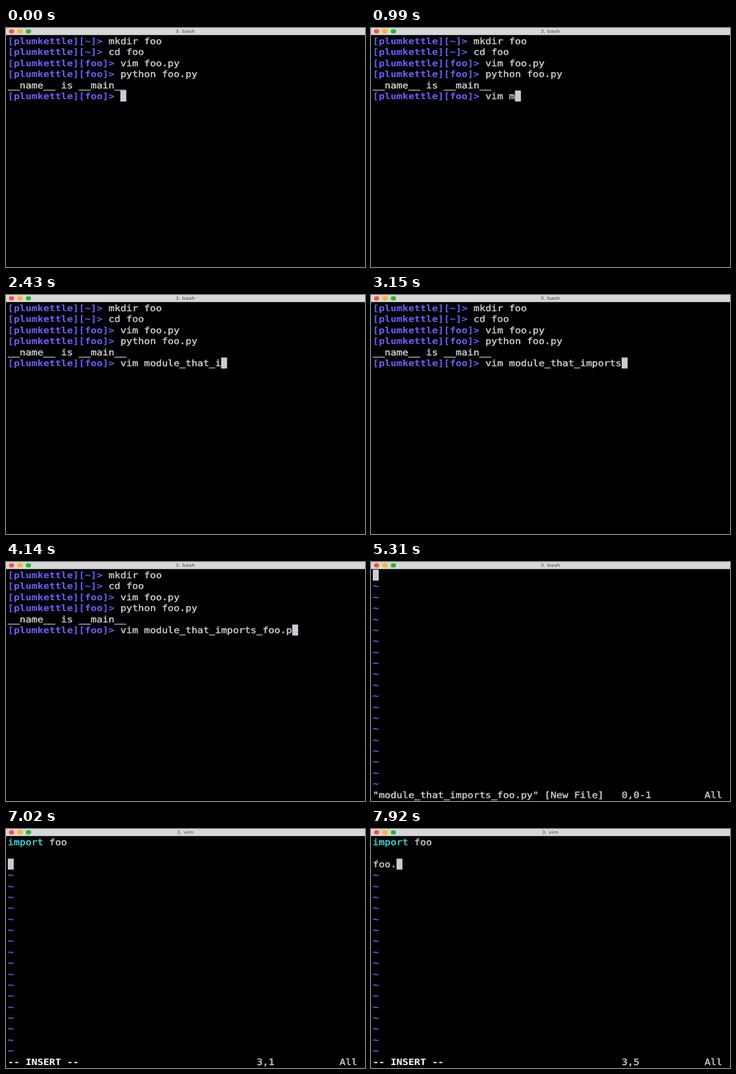
Animation, 600 px wide and 400 px high, one loop 8 s. Source, as an HTML page:

```html
<!DOCTYPE html>
<html lang="en">
<head>
<meta charset="utf-8">
<title>Terminal session</title>
<style>
  html, body { margin: 0; width: 100%; height: 100%; overflow: hidden; background: #000; }
  svg { display: block; width: 600px; height: 400px; }
  text { white-space: pre; text-rendering: geometricPrecision; }
  #screen text {
    font-family: "DejaVu Sans Mono", monospace;
    font-size: 16.45px;
    stroke-width: .5px;
  }
  .plain { fill: #cbcbc9; stroke: #cbcbc9; }
  .prompt { fill: #6c5fff; font-weight: bold; }
  .tilde { fill: #6c5fff; stroke: #6c5fff; }
  .keyword { fill: #3fe0e0; stroke: #3fe0e0; }
  .mode { fill: #fff; font-weight: bold; }
  .cursor { fill: #cbcbd2; }
  #title { font: 9px "DejaVu Sans", sans-serif; fill: #444; text-anchor: middle; }
</style>
</head>
<body>
<svg viewBox="0 0 600 400">
  <rect width="600" height="400"/>
  <rect width="600" height="11.8" fill="#d7d7da"/>
  <ellipse cx="9.3" cy="5.6" rx="4.5" ry="3.7" fill="#ff5238"/>
  <ellipse cx="23.4" cy="5.6" rx="4.5" ry="3.7" fill="#ffb41f"/>
  <ellipse cx="37.5" cy="5.6" rx="4.5" ry="3.7" fill="#1fba35"/>
  <text id="title" transform="translate(299.5 8.4) scale(1 .82)"></text>
  <g id="screen"></g>
</svg>
<script>
const NS = 'http://www.w3.org/2000/svg';
const LOOP = 8000, TICK = 90;
const LEFT = 3, CELL = 9.903, TOP = 12.8, LINE = 18.37, BASE = 14.3;
const ASPECT = 0.88; // the whole terminal is a little flattened
const USER = '[plumkettle]';
const FILE = 'module_that_imports_foo.py';
const COMMAND = 'vim ' + FILE;

// [time, characters typed so far]
const SHELL_KEYS = [[400, 0], [1800, 12], [3150, 23], [4140, 29], [4230, 30]];
const IMPORT_KEYS = [[5700, 0], [6300, 7], [6660, 10]];
const CALL_KEYS = [[7140, 0], [7830, 4]];
const OPEN = 4680, RETITLE = 5400, INSERT = 5580, ENTER_1 = 6840, ENTER_2 = 7020;

const screen = document.getElementById('screen');
const title = document.getElementById('title');

function typed(keys, t) {
  if (t <= keys[0][0]) return 0;
  for (let i = 1; i < keys.length; i++) {
    const [t0, n0] = keys[i - 1], [t1, n1] = keys[i];
    if (t < t1) return Math.floor(n0 + (n1 - n0) * (t - t0) / (t1 - t0));
  }
  return keys[keys.length - 1][1];
}

function add(tag, attrs) {
  const el = document.createElementNS(NS, tag);
  for (const k in attrs) el.setAttribute(k, attrs[k]);
  screen.append(el);
  return el;
}

function put(col, row, str, cls = 'plain') {
  const x = LEFT + col * CELL, y = TOP + row * LINE + BASE;
  const transform = `translate(${x} ${y}) scale(1 ${ASPECT})`;
  add('text', { transform, class: cls }).textContent = str;
}

function cursor(col, row) {
  add('rect', { x: LEFT + col * CELL, y: TOP + row * LINE, width: CELL, height: LINE, class: 'cursor' });
}

function prompt(row, dir, command) {
  const head = `${USER}[${dir}]>`;
  put(0, row, head, 'prompt');
  put(head.length + 1, row, command);
  return head.length + 1 + command.length;
}

function drawShell(t) {
  prompt(0, '~', 'mkdir foo');
  prompt(1, '~', 'cd foo');
  prompt(2, 'foo', 'vim foo.py');
  prompt(3, 'foo', 'python foo.py');
  put(0, 4, '__name__ is __main__');
  cursor(prompt(5, 'foo', COMMAND.slice(0, typed(SHELL_KEYS, t))), 5);
}

function drawEditor(t) {
  const first = 'import foo'.slice(0, typed(IMPORT_KEYS, t));
  const third = 'foo.'.slice(0, typed(CALL_KEYS, t));
  const row = t < ENTER_1 ? 0 : t < ENTER_2 ? 1 : 2;
  const col = [first, '', third][row].length;

  for (let r = row + 1; r < 20; r++) put(0, r, '~', 'tilde');
  if (first.length < 6) put(0, 0, first);
  else {
    put(0, 0, 'import', 'keyword');
    put(7, 0, first.slice(7));
  }
  put(0, 2, third);
  cursor(col, row);

  const inserting = t >= INSERT;
  if (inserting) put(0, 20, '-- INSERT --', 'mode');
  else put(0, 20, `"${FILE}" [New File]`);
  const line = first ? row + 1 : 0;
  put(42, 20, inserting ? `${line},${col + 1}` : '0,0-1');
  put(56, 20, 'All');
}

let last = -1;
function frame(now) {
  const t = Math.floor(now % LOOP / TICK) * TICK;
  if (t !== last) {
    last = t;
    screen.replaceChildren();
    title.textContent = t < RETITLE ? '3. bash' : '3. vim';
    (t < OPEN ? drawShell : drawEditor)(t);
  }
  requestAnimationFrame(frame);
}
frame(performance.now());
</script>
</body>
</html>
```
